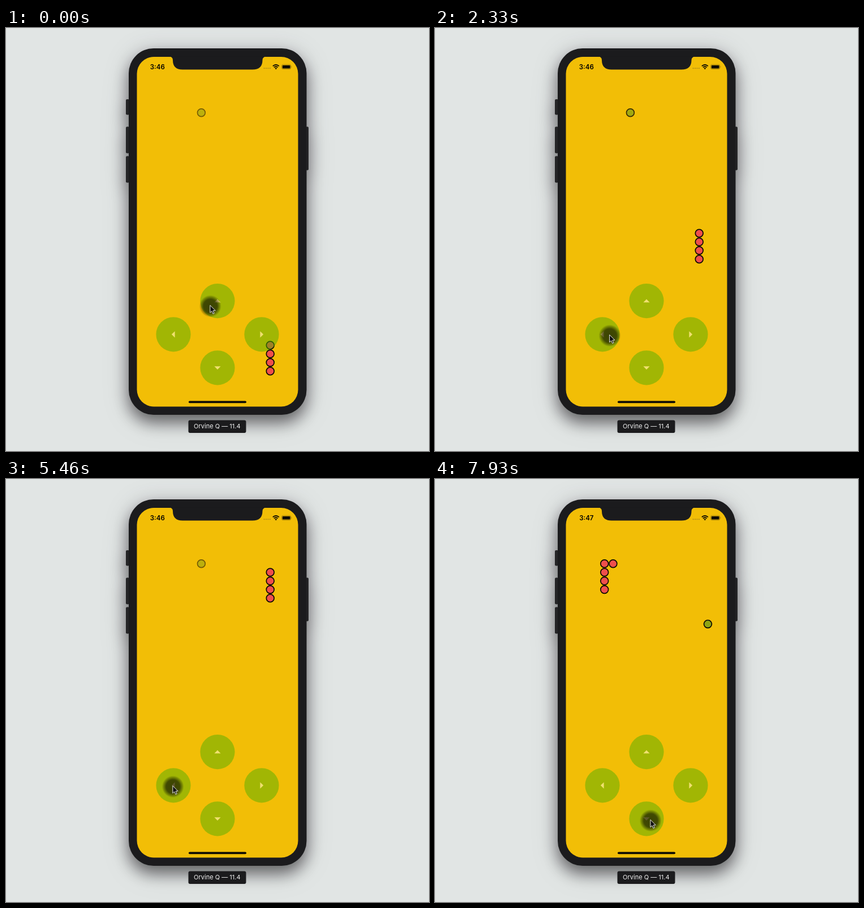
Write an HTML page that moves like this. It is 748 px wide and 748 px high and loops after 8 s.

```html
<!DOCTYPE html>
<html lang="en">
<head>
<meta charset="utf-8">
<title>Snake on a phone</title>
<style>
html, body { margin: 0; width: 100%; height: 100%; overflow: hidden; background: #e1e5e4; }
svg { position: absolute; left: 0; top: 0; width: 748px; height: 748px; display: block; }
text { font-family: Inter, "Liberation Sans", sans-serif; text-anchor: middle; }
.case { filter: drop-shadow(0 14px 14px rgba(0, 0, 0, .52)) drop-shadow(0 2px 20px rgba(40, 20, 60, .14)); }
.clock { font-size: 11.5px; font-weight: 600; }
.label { font-size: 11px; fill: #f2f2f2; }
.ball { stroke: #0a0803; stroke-width: 1.7; }
.snake { fill: #ef4f4c; }
.food { fill: #8ea414; }
</style>
</head>
<body>
<svg viewBox="0 0 748 748">
  <defs>
    <radialGradient id="touch">
      <stop offset="0" stop-color="#000" stop-opacity=".63"/>
      <stop offset=".62" stop-color="#000" stop-opacity=".6"/>
      <stop offset=".82" stop-color="#000" stop-opacity=".3"/>
      <stop offset="1" stop-color="#000" stop-opacity="0"/>
    </radialGradient>
  </defs>

  <g class="case">
    <g fill="#242426">
      <rect x="212" y="126" width="6" height="27.5" rx="2"/>
      <rect x="212" y="174.5" width="6" height="47" rx="2"/>
      <rect x="212" y="226.5" width="6" height="47" rx="2"/>
      <rect x="530" y="174.5" width="5" height="77" rx="2"/>
    </g>
    <rect x="217" y="36" width="314.5" height="648" rx="44" fill="#1b1b1d"/>
  </g>
  <rect x="231.5" y="51" width="285" height="618.5" rx="30" fill="#f2be06"/>
  <path d="M289 50.5 Q295 51 295 57 Q295 73.5 312 73.5 H436 Q453.5 73.5 453.5 57 Q453.5 51 460 50.5 Z" fill="#1b1b1d"/>

  <text id="clock" class="clock" x="267.8" y="72.7">3:46</text>
  <path d="M456.6 71.3 h10.3" stroke="#a98a1c" stroke-width="2" stroke-linecap="round" stroke-dasharray="0 3.4"/>
  <g fill="none" stroke="#0c0a04" stroke-width="1.8">
    <path d="M471.8 67.4 Q477.3 62.6 482.8 67.4"/>
    <path d="M473.9 69.7 Q477.3 66.7 480.7 69.7"/>
  </g>
  <path d="M475.3 71.2 Q477.3 69.6 479.3 71.2 L477.3 73.3 Z" fill="#0c0a04"/>
  <rect x="487.6" y="64.8" width="16" height="7.8" rx="2.2" fill="none" stroke="#8a6d08" stroke-width=".8"/>
  <rect x="488.8" y="65.9" width="13.7" height="5.6" rx="1.2" fill="#0c0a04"/>
  <path d="M504.6 67.3 q1.5 1.4 0 2.8 Z" fill="#8a6d08"/>

  <g id="balls"></g>
  <g id="pad"></g>
  <rect x="323" y="659.4" width="102" height="3.8" rx="1.9" fill="#0c0a04"/>

  <g id="pointer">
    <circle r="19.5" fill="url(#touch)"/>
    <path d="M-.4 -1.5 V11.6 L2.6 8.9 L4.7 13.6 L6.9 12.6 L4.9 8 L9 7.9 Z" fill="#111" stroke="#fff" stroke-width=".9" stroke-linejoin="round"/>
  </g>

  <rect x="322.5" y="693.5" width="102" height="22.5" rx="3" fill="#1b1b1d"/>
  <text class="label" x="373.3" y="708.4">Orvine Q — 11.4</text>
</svg>
<script>
const LOOP = 8000, CELL = 15.23, X0 = 299.7, Y0 = 149.8;
const COL = 11, ROW = 27;             // where the snake's head starts
const EATEN = ROW + COL - 3;          // moves needed to reach the food

// The snake advances in bursts: [first move, last move, number of moves]
const bursts = [
  [30, 130, 2], [500, 800, 3], [1130, 1130, 1], [1400, 2330, 7], [2730, 3130, 4],
  [3460, 4100, 4], [4400, 4800, 3], [5300, 5730, 5], [6100, 6160, 2], [6530, 7930, 10]
];

// Pointer drags: [start, end, to x, to y]
const drags = [
  [0, 800, 375.8, 481], [1400, 2330, 309, 544], [2730, 3130, 295.2, 544], [6530, 7460, 381.3, 604]
];

const $ = id => document.getElementById(id);
const lerp = (a, b, p) => a + (b - a) * p;
const ease = p => p * p * (3 - 2 * p);
const progress = (t, a, b) => Math.max(0, Math.min(1, (t - a) / Math.max(b - a, 1)));

function add(parent, tag, attrs) {
  const el = document.createElementNS("http://www.w3.org/2000/svg", tag);
  for (const k in attrs) el.setAttribute(k, attrs[k]);
  return parent.appendChild(el);
}

const ball = kind => add($("balls"), "circle", { r: 6.9, class: "ball " + kind });
const food = ball("food");
const snake = Array.from({ length: 5 }, () => ball("snake"));

function button(x, y, turn) {
  const g = add($("pad"), "g", { transform: `translate(${x} ${y})` });
  add(g, "circle", { r: 30.6, fill: "#52b002", "fill-opacity": .5 });
  add(g, "path", { d: "M-5.6 2.6 L0 -3.2 L5.6 2.6 Z", fill: "#f0e070", transform: `rotate(${turn})` });
  return g;
}
button(374, 482.6, 0);
button(452, 541.8, 90);
const down = button(374, 600.8, 180);
const left = button(296, 541.8, -90);

function movesAt(t) {
  return bursts.filter(b => t >= b[0])
    .reduce((n, [a, b, count]) => n + 1 + Math.floor((count - 1) * progress(t, a, b)), 0);
}

// Up the right side, left along the top row, then down
function cell(n) {
  if (n <= ROW) return [COL, ROW - n];
  return [Math.max(ROW + COL - n, 0), Math.max(n - ROW - COL, 0)];
}

function place(el, [col, row]) {
  el.setAttribute("cx", X0 + col * CELL);
  el.setAttribute("cy", Y0 + row * CELL);
}

function pointerAt(t) {
  return drags.reduce(([x, y], [a, b, toX, toY]) => {
    const p = ease(progress(t, a, b));
    return [lerp(x, toX, p), lerp(y, toY, p)];
  }, [361.3, 491.8]);
}

const press = (t, a, b) => t < a ? 1 : lerp(.45, 1, progress(t, a, b));
const pulse = t => .53 + .29 * Math.sin(Math.PI * t / 5800) ** 2;

function draw(now) {
  const t = now % LOOP, n = movesAt(t), eaten = n >= EATEN;
  snake.forEach((s, i) => place(s, cell(n - i)));
  snake[4].style.display = n > EATEN ? "" : "none";
  place(food, eaten ? [12, 7] : [3, 0]);
  food.setAttribute("opacity", eaten ? 1 : pulse(t));
  left.setAttribute("opacity", press(t, 5500, 5730));
  down.setAttribute("opacity", press(t, 7500, 7900));
  $("pointer").setAttribute("transform", `translate(${pointerAt(t)})`);
  $("clock").textContent = t < 6100 ? "3:46" : "3:47";
}

const start = performance.now();
function frame() {
  draw(performance.now() - start);
  requestAnimationFrame(frame);
}
frame();
</script>
</body>
</html>
```
